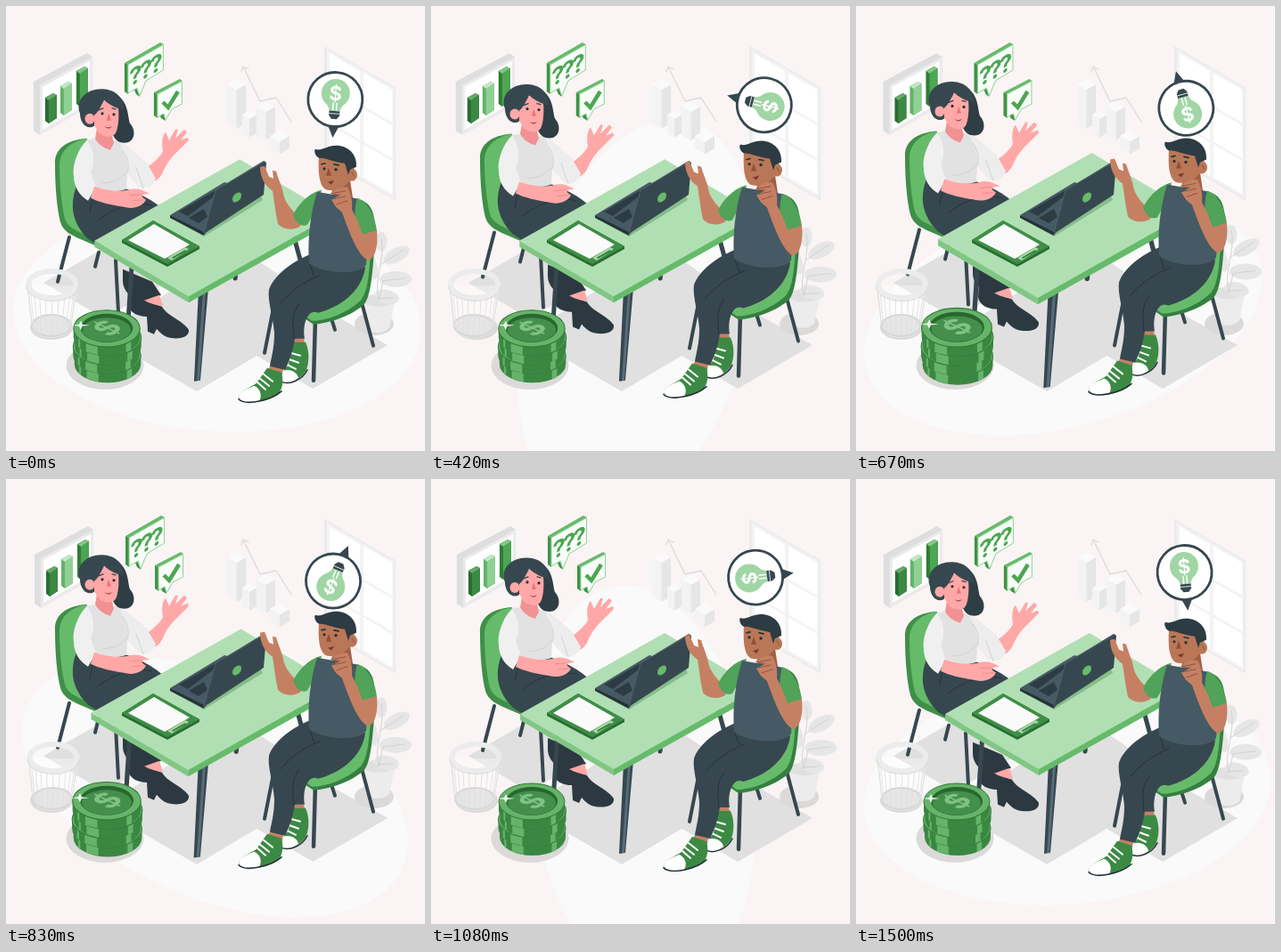
An HTML page that plays this animation: 470 px wide and 500 px high, repeating every 1540 ms.

```html
<!DOCTYPE html>
<html lang="en">
<head>
<meta charset="utf-8">
<title>Business meeting</title>
<style>
html, body { margin: 0; height: 100%; overflow: hidden; background: #faf4f4 }
svg { display: block; width: 470px; height: 500px }
text { font-family: Inter, Arial, sans-serif; font-weight: 700; text-anchor: middle }
.line { fill: none; stroke-linecap: round; stroke-linejoin: round }
</style>
</head>
<body>
<svg viewBox="0 0 470 500">
  <ellipse id="blob" cx="237" cy="353" rx="229" ry="125" fill="#fafafa"/>

  <g id="floor" fill="#e0e0e0">
    <path d="M42 311 110 272 180 311 110 351ZM105 370 214 433 365 343 262 272ZM273 388 344 430 428 381 352 338Z"/>
    <g fill="#dcd9d9"><ellipse cx="111" cy="404" rx="43.500" ry="27"/><ellipse cx="51" cy="361" rx="24" ry="14"/><ellipse cx="413" cy="357" rx="22" ry="13"/></g>
  </g>

  <g id="window" transform="matrix(1 .58 0 1 357 45)">
    <path d="M0 0H80V127H0Z" fill="#ebebeb"/><path d="M3 2H78V125H3Z" fill="#f3f3f3"/>
  </g>
  <g id="greyBars"></g>
  <path class="line" d="M266 68 285 107 303 103 320 130M264 74 266 68 272 71" stroke="#dcdcdc" stroke-width="1.300"/>

  <g class="slide">
    <path d="M31 85 91 53 97 57V111L38 145 31 140Z" fill="#dedede"/>
    <path d="M38 89 97 57V111L38 145Z" fill="#ebebeb"/>
    <path d="M41 91 94 62V109L41 139Z" fill="#fff"/>
    <g id="boardBars"></g>
    <g stroke-linejoin="round">
      <path d="M133 64 173 41 177 43 137 66ZM166 97 195 82 198 84 170 99Z" fill="#66bb6a"/>
      <path d="M133 64 137 66V99L133 96ZM144 94 147 93 150 102 146 99ZM166 97 170 99V126L166 123ZM173 123 177 121 179 129 174 126Z" fill="#3f9347"/>
      <path d="M137 66 176.500 43.500V72L157 84 150 101 147 92 137 98Z" fill="#f9fdf9" stroke="#8fd093"/>
      <path d="M170 99 197.500 84.500V110L186 116 179 128 177 121 170 125Z" fill="#f9fdf9" stroke="#8fd093"/>
    </g>
    <text transform="matrix(1 -.57 0 1 155.500 81.500)" font-size="26" letter-spacing="-3" fill="#4ca653">???</text>
    <path d="M176 108 182 114 193 96" fill="none" stroke="#4ca653" stroke-width="4.500"/>
  </g>

  <g class="float">
    <path class="line" d="M71 260 58 310M104 277 100 293M123 286 126 344" stroke="#37474f" stroke-width="4"/>
    <path d="M90 149C69 151 54 160 55 178 55 202 57 228 61 243 64 253 72 257 83 262L120 278 128 255 98 200Z" fill="#3f8f48"/>
    <path d="M91 149C75 152 60 161 60 180 60 204 63 227 66 239 69 249 78 252 88 257L118 270 124 250 98 195Z" fill="#66bb6a"/>
    <g fill="#2c3940">
      <path d="M131 296 164 310 174 325 158 332 146 330C136 325 131 317 131 309Z"/>
      <path d="M138 315 158 330 161 349C150 350 139 346 137 336Z"/>
      <path d="M157 332 175 338C180 348 199 354 205 364 206 372 196 375 184 373 178 372 173 368 169 363L166 369 159 366Z"/>
    </g>
    <path d="M155 331 172 325 176 337C170 337 163 335 155 331Z" fill="#ffa8a7"/>
    <path d="M79 203C71 224 74 244 92 262L108 272 180 232C167 220 148 208 125 203Z" fill="#37474f"/>
    <path class="line" d="M98 212 94 232M103 241C123 226 144 220 163 224" stroke="#26343b"/>
    <path d="M157 182C164 178 174 169 176 163 174 152 176 145 179 142L183 151 190 139 193 139 190 149 200 139 203 142 196 151 204 148 205 151 196 160C188 168 181 174 175 189 170 197 165 200 158 194Z" fill="#ffa8a7"/>
    <path d="M91 151 104 148 125 152C134 154 145 166 158 177L168 194C164 203 155 207 149 203L136 188 135 206C119 211 94 211 83 207 75 190 82 167 91 151Z" fill="#e2e2e2"/>
    <path d="M127 152C136 156 147 168 158 177L168 194C164 203 155 207 149 203L136 188C138 176 132 166 127 152Z" fill="#ededed"/>
    <path d="M91 151C81 160 74 179 76 191 76 203 82 213 92 219L101 204 95 187C101 174 98 161 91 151Z" fill="#f0f0f0"/>
    <path class="line" d="M136 188C139 178 136 169 131 163M146 182 154 205M108 199C119 199 129 195 134 188" stroke="#d2d2d2"/>
    <path d="M99 203C112 208 126 209 137 207 145 204 153 206 161 211 153 212 149 213 157 218 153 226 142 229 132 226 119 224 105 221 95 216Z" fill="#ffa8a7"/>
    <path class="line" d="M139 213 151 212M142 219 154 218" stroke="#e78182" stroke-width=".700"/>
    <path d="M118 97C138 104 136 123 139 132 147 141 144 154 133 154 121 154 119 143 116 133Z" fill="#2f3d44"/>
    <path d="M102 138 119 146 121 154 117 162C109 160 103 155 100 149Z" fill="#f29193"/>
    <path d="M98 112C105 104 123 106 126 115 127 125 126 137 123 143 119 150 107 147 103 141L99 134Z" fill="#ffa8a7"/>
    <path d="M83 121C77 105 91 93 108 93.500 123 94 132 103 132 117 122 115 115 110 110 106 106 114 103 120 99 123L99 135C91 140 83 132 83 121Z" fill="#37474f"/>
    <ellipse cx="94" cy="127" rx="5.500" ry="6" fill="#ffa8a7"/>
    <path class="line" d="M104 117 109 115M119 115 123 116" stroke="#37474f" stroke-width="1.300"/>
    <g fill="#263238"><circle cx="108" cy="121" r="1.600"/><circle cx="121" cy="122" r="1.600"/></g>
    <path d="M115 121 118 129 113 129Z" fill="#ed7378"/>
    <path d="M110 135Q115 138 119 135 116 141 110 135Z" fill="#a94950"/>
  </g>

  <g class="pulse">
    <path class="line" d="M258 295 257 306M322 258 331 291M142 285 137 362" stroke="#37474f" stroke-width="5"/>
    <path d="M216 319 227 316 218 420 211 421Z" fill="#37474f"/>
    <path d="M221 320 224 319 217 420H214Z" fill="#566d79"/>
    <path d="M100 264 205 325V333L100 271Z" fill="#81c784"/>
    <path d="M205 325 366 235V243L205 333Z" fill="#66bb6a"/>
    <path d="M100 264 262 173 366 235 205 326Z" fill="#b1dfb4"/>
  </g>

  <path d="M184 238 222 259 288 218 284 209 222 247Z" fill="#85bd89"/>
  <path d="M184 235 245 198 252 200 223 257Z" fill="#455a64"/>
  <path d="M184 235 222 254V258L184 238Z" fill="#263238"/>
  <path d="M194 231 237 206 241 208 204 236ZM205 238 222 228 226 237 216 244Z" fill="#2d3b43"/>
  <path d="M235 207 289 174 292 176 289 212 222 256Z" fill="#37474f"/>
  <path class="line" d="M222 255 235 207 290 175" stroke="#4d616b"/>
  <ellipse cx="259" cy="215" rx="5" ry="5" transform="matrix(1 -.5 0 1 0 129.500)" fill="#66bb6a"/>

  <path d="M130 263 165 241 217 270V273L181 293 130 266Z" fill="#286d30"/>
  <path d="M130 263 165 241 217 270 181 290Z" fill="#3f8e47"/>
  <path d="M137 263 166 245 206 268 178 284Z" fill="#fafafa"/>
  <path d="M181 283 201 271 205 273 186 286Z" fill="#a5d6a7"/>
  <path class="line" d="M187 283 201 275" stroke="#2e7d32" stroke-width="1.500"/>

  <g class="slide" id="basket">
    <path d="M23 314 29 363C35 376 66 376 74 363L81 314Z" fill="#fff" opacity=".3"/>
    <ellipse cx="51" cy="359" rx="22" ry="12" fill="none" stroke="#d6d6d6" stroke-width="2"/>
    <g id="wires" stroke="#e0e0e0" stroke-width=".900"></g>
    <ellipse cx="52" cy="313" rx="26.500" ry="15" fill="none" stroke="#ececec" stroke-width="6"/>
    <path class="line" d="M23 315C24 336 79 338 81 315" stroke="#d9d9d9"/>
  </g>

  <g class="pulse" id="coins"></g>

  <g class="float">
    <g fill="#e6e6e6">
      <path d="M400 333H436L430 362C424 369 410 369 404 362Z" fill="#ececec"/>
      <ellipse cx="418" cy="331" rx="18" ry="7" fill="#e0e0e0"/>
      <ellipse cx="421" cy="265" rx="6.500" ry="11"/><ellipse cx="438" cy="280" rx="16" ry="8" transform="rotate(-28 438 280)"/>
      <ellipse cx="437" cy="307" rx="18" ry="9"/><ellipse cx="427" cy="327" rx="14" ry="8" transform="rotate(12 427 327)"/>
      <ellipse cx="409" cy="291" rx="7" ry="17" transform="rotate(-18 409 291)"/>
    </g>
    <path class="line" d="M421 261C426 285 412 306 418 331L423 309 448 306M420 291 446 274M417 329 435 328" stroke="#d3d3d3"/>

    <path class="line" d="M302 329 290 390M363 345 369 364M397 326 412 382" stroke="#37474f" stroke-width="4"/>
    <path class="line" d="M347 351 345 421" stroke="#37474f" stroke-width="4.500"/>
    <path d="M398 218C413 224 416 238 413 275 411 302 409 326 402 335 389 348 362 357 345 358L333 350 355 325Z" fill="#348040"/>
    <path d="M398 218C411 225 411 246 409 278 407 307 405 322 398 331 382 346 359 354 343 354L336 349 352 325Z" fill="#66bb6a"/>

    <path d="M323 373 334 374 336 383 321 381ZM298 402 312 405 309 417 293 410Z" fill="#c58063"/>
    <path d="M321 378 336 378C341 389 340 403 336 411 329 421 316 426 309 422 306 416 312 410 317 403Z" fill="#3c8944"/>
    <path d="M311 410C319 407 327 412 328 418 321 424 312 426 308 421Z" fill="#fff"/>
    <path class="line" d="M308 422C318 427 333 420 338 409" stroke="#263238" stroke-width="1.500"/>
    <path d="M293 407 309 412C312 423 310 435 301 439 286 447 266 448 261 441 260 434 274 429 281 424Z" fill="#3c8944"/>
    <path d="M261 439C262 433 272 430 278 427 285 429 288 438 284 444 273 447 262 446 261 439Z" fill="#fff"/>
    <path class="line" d="M261 442C269 450 298 443 309 433" stroke="#263238" stroke-width="1.600"/>
    <path class="line" d="M282 423 291 431M285 419 295 427M289 414 299 422M315 403 325 408M317 397 328 401M319 390 330 393" stroke="#fff" stroke-width="2"/>
    <path d="M342 279C319 288 300 304 295 319 293 331 300 351 301 368 301 386 297 397 296 405L313 409C319 397 322 387 324 374L335 374C332 355 340 340 350 345 374 339 400 321 403 293 384 302 359 296 342 279Z" fill="#37474f"/>
    <path class="line" d="M352 303C331 311 316 324 308 334M323 374C321 355 321 344 329 335M341 291 346 304" stroke="#25333a"/>

    <path d="M331 247C323 253 311 252 305 245 302 232 301 220 299 208 290 202 285 192 285 181L290 180 295 192 300 194 299 185 303 186C306 196 310 204 311 211 313 221 320 229 327 235Z" fill="#c58063"/>
    <path d="M354 207C342 209 328 222 322 235 325 244 332 249 338 246L349 226Z" fill="#50a358"/>
    <path d="M370 199 386 196 389 216C380 220 370 218 365 210Z" fill="#a06046"/>
    <path d="M349 209C362 212 384 214 395 217 408 227 408 253 404 291 396 303 357 302 340 289 338 264 341 234 349 209Z" fill="#455a64"/>
    <path d="M394 216C406 220 414 237 416 253 409 260 402 259 396 256 389 243 391 226 394 216Z" fill="#50a358"/>
    <path d="M351 169C350 187 351 201 358 206 367 210 379 205 383 199L391 193 390 173 370 165Z" fill="#b97757"/>
    <ellipse cx="388" cy="190" rx="6" ry="7" fill="#b97757"/>
    <path d="M347 161C353 164 360 157 370 157 384 157 394 167 393 181L386 184 384 190 380 177C369 176 357 170 351 171 347 169 345 163 347 161Z" fill="#2d3b43"/>
    <g fill="#263238"><circle cx="357" cy="183" r="1.600"/><circle cx="370" cy="184" r="1.700"/></g>
    <path class="line" d="M354 178 358 177M368 178 373 179" stroke="#263238" stroke-width="1.700"/>
    <path d="M362 182 359 191 365 191Z" fill="#925039"/>
    <path d="M361 198 368 196 365 201Z" fill="#743a31"/>
    <path d="M364 211C371 204 379 203 383 204 387 211 389 220 388 229 395 242 398 251 400 257L416 252C418 272 413 285 406 286 394 280 385 254 377 232L370 226 365 218 376 212Z" fill="#c58063"/>
    <path class="line" d="M365 211 381 208M367 217 381 214M371 223 383 219M388 187 391 192" stroke="#8e5139" stroke-width=".900"/>
  </g>

  <g id="idea">
    <path d="M-7 23 0 38 7 23Z" fill="#37474f"/>
    <circle cy="-5" r="30.500" fill="#fff" stroke="#37474f" stroke-width="2.800"/>
    <path d="M-14 -6C-10 1 -7 2 -6 8H6C7 2 10 1 14 -6Z" fill="#a0d6a3"/>
    <circle cy="-12" r="16" fill="#a0d6a3"/>
    <path class="line" d="M-2 7V-1M2 7V-1" stroke="#fff" stroke-width="1.500"/>
    <text y="-4" font-size="22" fill="#fff">$</text>
    <path d="M-6 8H6V13L3 17H-3L-6 13Z" fill="#37474f"/>
    <path d="M-6 11H6" stroke="#fff" stroke-width=".800"/>
  </g>
</svg>
<script>
const LOOP = 1540;
const $ = id => document.getElementById(id);
const all = name => document.querySelectorAll('.' + name);
const add = (id, markup) => $(id).insertAdjacentHTML('beforeend', markup);
const shape = (d, fill) => `<path d="${d}" fill="${fill}"/>`;

function prism(x, y, w, h, slant, [top, left, right]) {
  const half = w / 2, dy = half * slant;
  return shape(`M${x} ${y}v${h}l${half} ${dy}v${-h}Z`, left) +
    shape(`M${x + half} ${y + dy}v${h}l${half} ${-dy}v${-h}Z`, right) +
    shape(`M${x} ${y}l${half} ${-dy} ${half} ${dy} ${-half} ${dy}Z`, top);
}

for (let i = 0; i < 6; i++) {
  add('window', `<rect x="${i % 2 ? 44 : 6}" y="${5 + 40 * (i >> 1)}" width="${i % 2 ? 32 : 34}" height="37" fill="#fff"/>`);
}

const grey = ['#fafafa', '#f3f3f3', '#e6e6e6'];
[[248, 88, 21, 44], [265, 122, 16, 21], [281, 113, 21, 32], [296, 146, 22, 14]]
  .forEach(([x, y, w, h]) => add('greyBars', prism(x, y, w, h, .58, grey)));

[[44, 103, 26, ['#66a96b', '#286d30', '#3c8944']],
 [61, 90, 30, ['#c3e6c5', '#64b269', '#91d094']],
 [79, 73, 37, ['#81c784', '#2e7d32', '#4ca653']]]
  .forEach(([x, y, h, tones]) => add('boardBars',
    shape(`M${x} ${y}l9-5 4 2v${h}l-9 6-4-3Z`, tones[1]) +
    shape(`M${x + 4} ${y + 3}l9-6v${h}l-9 6Z`, tones[2]) +
    shape(`M${x} ${y}l9-5 4 2-9 6Z`, tones[0])));

for (let i = 0; i <= 12; i++) {
  const c = Math.cos(i * Math.PI / 12), s = Math.sin(i * Math.PI / 12);
  add('wires', `<path d="M${52 + 28 * c} ${314 + 16 * s}L${51 + 22 * c} ${359 + 12 * s}"/>`);
}

for (let i = 3; i >= 0; i--) {
  const x = 113 + [0, 1.5, -.5, 1][i], y = 362.5 + i * 10;
  const edge = (a, b) => {
    const at = (q, dy) => `${x + 37 * Math.cos(q)} ${y + dy + 20.5 * Math.sin(q)}`;
    return shape(`M${at(a, 0)}L${at(a, 10)}L${at(b, 10)}L${at(b, 0)}Z`, '#66b36a');
  };
  add('coins', shape(`M${x - 37} ${y}v10a37 20.500 0 0 0 74 0v-10Z`, '#3a8742') +
    edge(.75, .95) + edge(1.85, 2.25) + edge(2.5, 2.6) +
    `<ellipse cx="${x}" cy="${y}" rx="37" ry="20.500" fill="#66b36a" stroke="#2f7a37"/>`);
}
add('coins', `<ellipse cx="113" cy="362" rx="29" ry="16" fill="#28682f"/>
  <ellipse cx="113" cy="364" rx="27" ry="13.500" fill="#458f4c"/>
  <text transform="translate(114 362) scale(1 .6) rotate(-52)" y="13" font-size="38" fill="#7fc284">$</text>
  <path d="M75 359 82 358 84 354 86 358 94 359 86 360 84 364 82 360Z" fill="#fff" opacity=".85"/>`);

// Piecewise linear value at x through [x, y] points.
function along(points, x) {
  const i = points.findIndex(([end]) => end >= x) || 1;
  const [x0, y0] = points[i - 1], [x1, y1] = points[i];
  return y0 + (y1 - y0) * (x - x0) / (x1 - x0);
}

const clock = [[0, .01], [1080, .73], [LOOP, 1.01]];
const shake = [0, -1, 2, -4, 4, -4, 4, -4, 2, -1, 0].map((dx, i) => [i / 10, dx * .94]);
const hover = [[0, 0], [.5, -9.4], [1, 0]];
const beat = [[0, 1], [.14, 1.075], [.28, 1], [.42, 1.075], [.7, 1], [1, 1]];

const move = (nodes, value) => nodes.forEach(node => node.setAttribute('transform', value));
const sliders = all('slide'), floaters = all('float'), pulsers = all('pulse');
const centres = [[222, 297], [113, 382]];

function draw(now) {
  const phase = along(clock, now % LOOP) % 1, angle = 360 * phase;
  $('blob').setAttribute('transform', `rotate(${angle} 235 350)`);
  $('idea').setAttribute('transform', `translate(369 110) rotate(${angle})`);
  move(sliders, `translate(${along(shake, phase)} 0)`);
  move(floaters, `translate(0 ${along(hover, phase)})`);
  const scale = along(beat, phase);
  pulsers.forEach((node, i) => {
    const [x, y] = centres[i];
    move([node], `translate(${x} ${y}) scale(${scale}) translate(${-x} ${-y})`);
  });
  requestAnimationFrame(draw);
}
requestAnimationFrame(draw);
</script>
</body>
</html>
```
